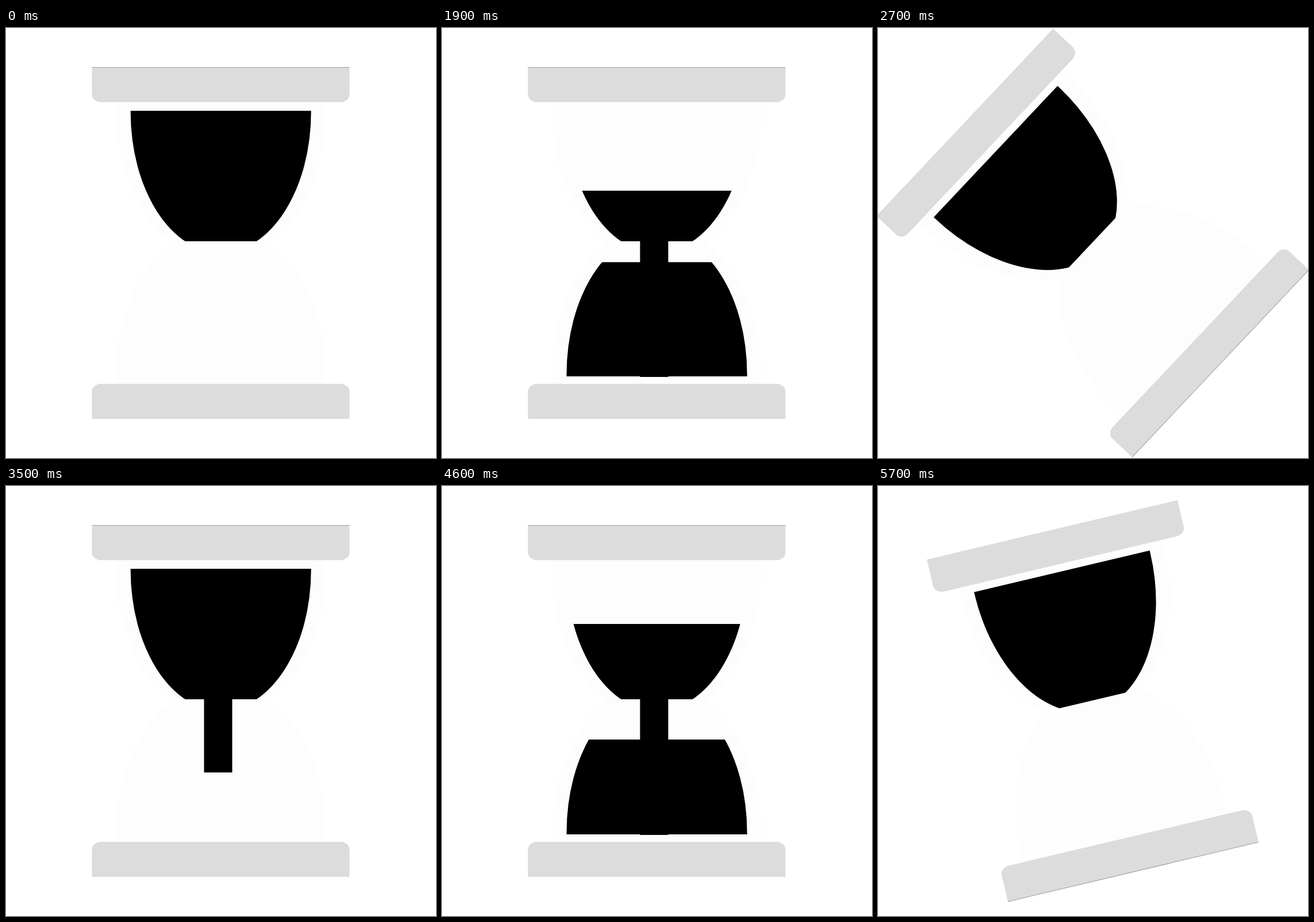
Animation, 748 px wide and 748 px high, one loop 5810 ms. Source, as an HTML page:

```html
<!DOCTYPE html>
<html lang="en">
<head>
<meta charset="utf-8">
<title>Hourglass</title>
<style>
  html, body { margin: 0; width: 100%; height: 100%; overflow: hidden; background: #fff; }
  svg { display: block; width: 100%; height: 100%; }
</style>
</head>
<body>
<svg viewBox="0 0 748 748">
  <defs>
    <clipPath id="bowl">
      <ellipse cx="373.7" cy="146" rx="157" ry="245"/>
      <rect x="216.7" y="140" width="314" height="6"/>
    </clipPath>
    <path id="glass" fill="#fdfdfd" d="M191 129V146A182.5 258 0 0 0 288.1 374H458.9A182.5 258 0 0 0 556 146V129Z"/>
    <path id="cap" fill="#dcdcdc" d="M149.5 68H597.5V116Q597 126 584 129H163Q150 126 149.5 116Z"/>
  </defs>
  <g id="timer">
    <use href="#glass"/>
    <use href="#glass" transform="matrix(1 0 0 -1 0 748)"/>
    <use href="#cap"/>
    <use href="#cap" transform="matrix(1 0 0 -1 0 748)"/>
    <path d="M149.5 68.5H597.5" stroke="#a0a0a0"/>
    <g clip-path="url(#bowl)"><rect id="upper" x="200" width="350"/></g>
    <rect id="stem" x="344.5" y="371" width="49"/>
    <g transform="matrix(1 0 0 -1 0 748)">
      <g clip-path="url(#bowl)"><rect id="lower" x="200" y="142" width="350"/></g>
    </g>
  </g>
</svg>
<script>
  const LOOP = 5810, CYCLE = 2900, STEP = 100, TURN = 2300;
  const NECK = 371, BRIM = 144;
  const [timer, upper, stem, lower] =
    ['timer', 'upper', 'stem', 'lower'].map(id => document.getElementById(id));

  const clamp = (v, lo, hi) => Math.min(hi, Math.max(lo, v));

  // Eased progress from 0 to 1 between two times
  function ease(t, from, to) {
    const u = clamp((t - from) / (to - from), 0, 1);
    return u * u * (3 - 2 * u);
  }

  const setHeight = (el, h) => el.setAttribute('height', Math.max(0, h).toFixed(2));

  // Sand level in the upper bowl, speeding up as the bowl narrows
  function upperLevel(t) {
    if (t < 1000) return BRIM;
    if (t >= TURN) return NECK;
    const s = (t - 1500) / 100;
    return clamp(201 + 18.5 * s + 0.5 * s * s, BRIM, NECK);
  }

  function draw(t) {
    const level = upperLevel(t);
    upper.setAttribute('y', level);
    setHeight(upper, NECK - level);
    setHeight(stem, t < TURN ? 236 * ease(t, 300, 870) : 0);
    setHeight(lower, 231 * ease(t, 600, TURN));
    const angle = 180 * ease(t, TURN, CYCLE);
    timer.setAttribute('transform', `rotate(${angle.toFixed(3)} 373.5 374)`);
  }

  const start = performance.now();

  function tick() {
    const now = (performance.now() - start) % LOOP;
    const held = Math.min(Math.floor(now / STEP) * STEP, 2 * CYCLE - STEP);
    draw(held % CYCLE);
    requestAnimationFrame(tick);
  }
  tick();
</script>
</body>
</html>
```
